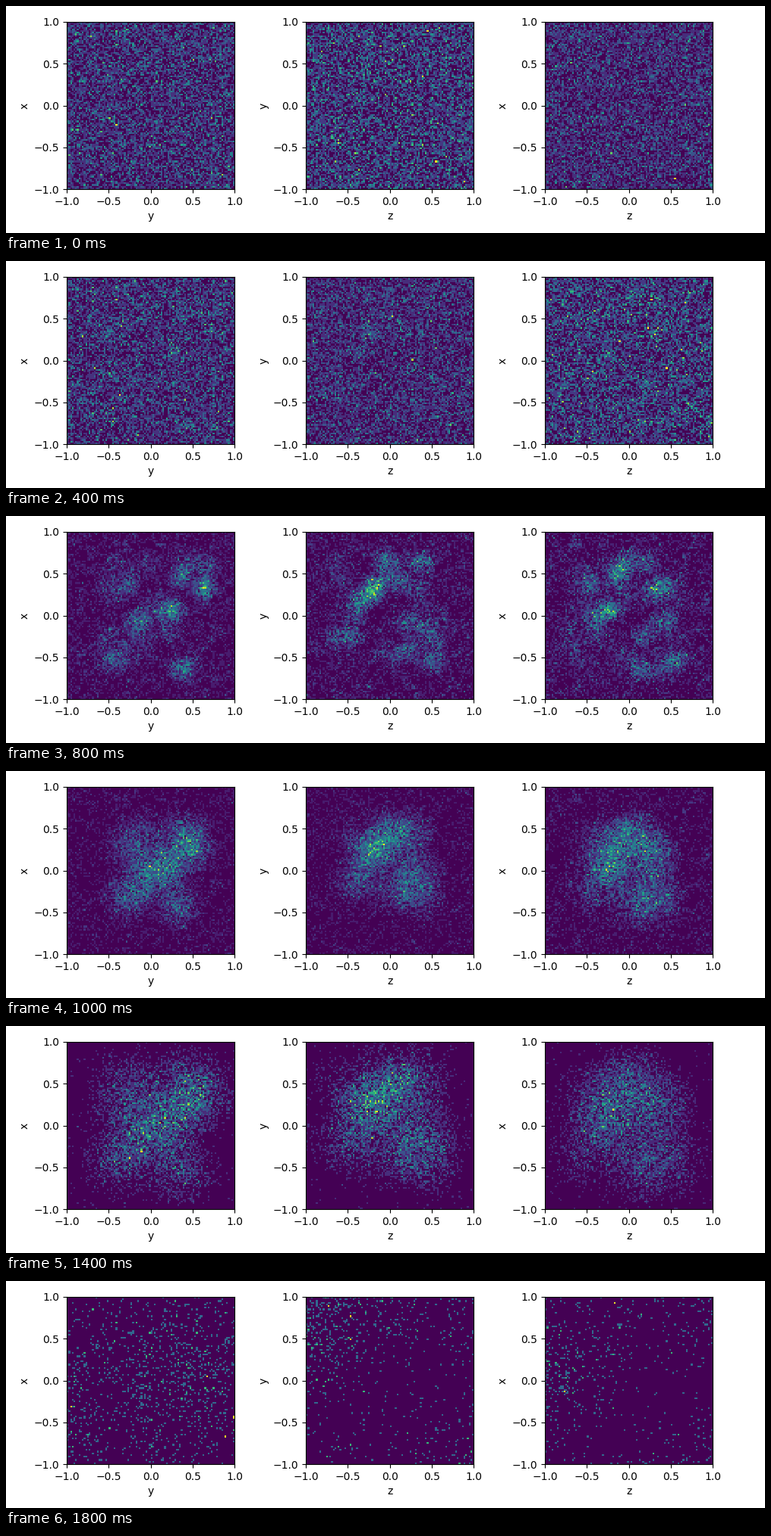
These frames come from a looping animation (1000 by 300 pixels, 2 s). A matplotlib script:

```python
import numpy as np
import matplotlib.pyplot as plt
from matplotlib.animation import FuncAnimation

W, H = 1000, 300
COUNT, BINS, NODES = 10000, 100, 40
FRAMES, INTERVAL = 10, 200
X, Y, Z = range(3)
CENTRE = np.array([.05, .18, 0])

rng = np.random.default_rng(7)


def random_ball(n):
    points = rng.normal(size=(n, 3))
    return points * np.sqrt(rng.random((n, 1))) / np.linalg.norm(points, axis=1, keepdims=True)


home = rng.uniform(-1, 1, (COUNT, 3))
rank = rng.random((COUNT, 1))
cloud = random_ball(COUNT)

# short periodic waves that gather the free particles into a web
waves = rng.integers(-7, 8, (60, 3))
norms = np.sum(waves ** 2, axis=1, keepdims=True)
waves, norms = waves[norms[:, 0] > 16], norms[norms[:, 0] > 16]
swell = np.sin(np.pi * home @ waves.T + rng.uniform(0, 2 * np.pi, len(waves)))
drift = swell @ (waves / norms)

# the heaviest clumps come first, the small ones are scattered
nodes = rng.uniform(-.85, .85, (NODES, 3))
nodes[:5] = [(.08, .3, -.24), (.4, .72, .5), (.5, .36, -.2), (-.78, .47, .1), (.67, .78, -.1)]
weights = 1 / (np.arange(NODES) + 4)
owner = rng.choice(NODES, COUNT, p=weights / weights.sum())

# part of each clump trails off towards its nearest neighbour
gaps = np.linalg.norm(nodes[:, None] - nodes, axis=2) + 9 * np.eye(NODES)
nearest = nodes[gaps.argmin(axis=1)]
trail = rng.random((COUNT, 1)) ** 4
anchor = nodes[owner] + trail * (nearest[owner] - nodes[owner])


def keyed(step, *keys):
    times, values = zip(*keys)
    return np.interp(step, times, values)


def positions(step):
    """Uniform gas, then a web, a collapse into one core and a burst outwards."""
    ripple = keyed(step, (0, 0), (2, .02), (3, .05), (4, .07))
    bound = keyed(step, (0, 0), (2, .05), (3, .13), (4, .5), (6, .95), (7, .65), (9, .5))
    scale = keyed(step, (3, 1), (4, .85), (6, .38), (7, .75), (9, 4))
    size = keyed(step, (0, .2), (2, .12), (3, .07), (4, .17), (6, .4), (7, .42), (9, 1))
    spread = keyed(step, (6, 1), (7, 3.5), (9, 4.5))

    free = spread * ((home + ripple * drift + 1) % 2 - 1)
    clumped = CENTRE + scale * (anchor - CENTRE) + size * cloud
    return np.where(rank < bound, clumped, free)


def density(pos, across, up):
    return np.histogram2d(pos[:, up], pos[:, across], BINS, [[-1, 1], [-1, 1]])[0]


fig = plt.figure(figsize=(W / 100, H / 100), dpi=100, facecolor="white")
edges = np.linspace(-1, 1, BINS + 1)
ticks = np.linspace(-1, 1, 5)
panels = []
for i, (across, up) in enumerate([(Y, X), (Z, Y), (Z, X)]):
    ax = fig.add_axes([(80.2 + 315 * i) / W, 58 / H, 221 / W, 221 / H])
    mesh = ax.pcolormesh(edges, edges, np.zeros((BINS, BINS)), cmap="viridis")
    ax.set(xlim=(-1, 1), ylim=(-1, 1), xticks=ticks, yticks=ticks,
           xlabel="xyz"[across], ylabel="xyz"[up])
    panels.append((mesh, across, up))


def update(step):
    pos = positions(step)
    for mesh, across, up in panels:
        counts = density(pos, across, up)
        mesh.set_array(counts)
        mesh.set_clim(0, counts.max())
    return [mesh for mesh, _, _ in panels]


anim = FuncAnimation(fig, update, frames=FRAMES, interval=INTERVAL, repeat=True)
plt.show()
```
